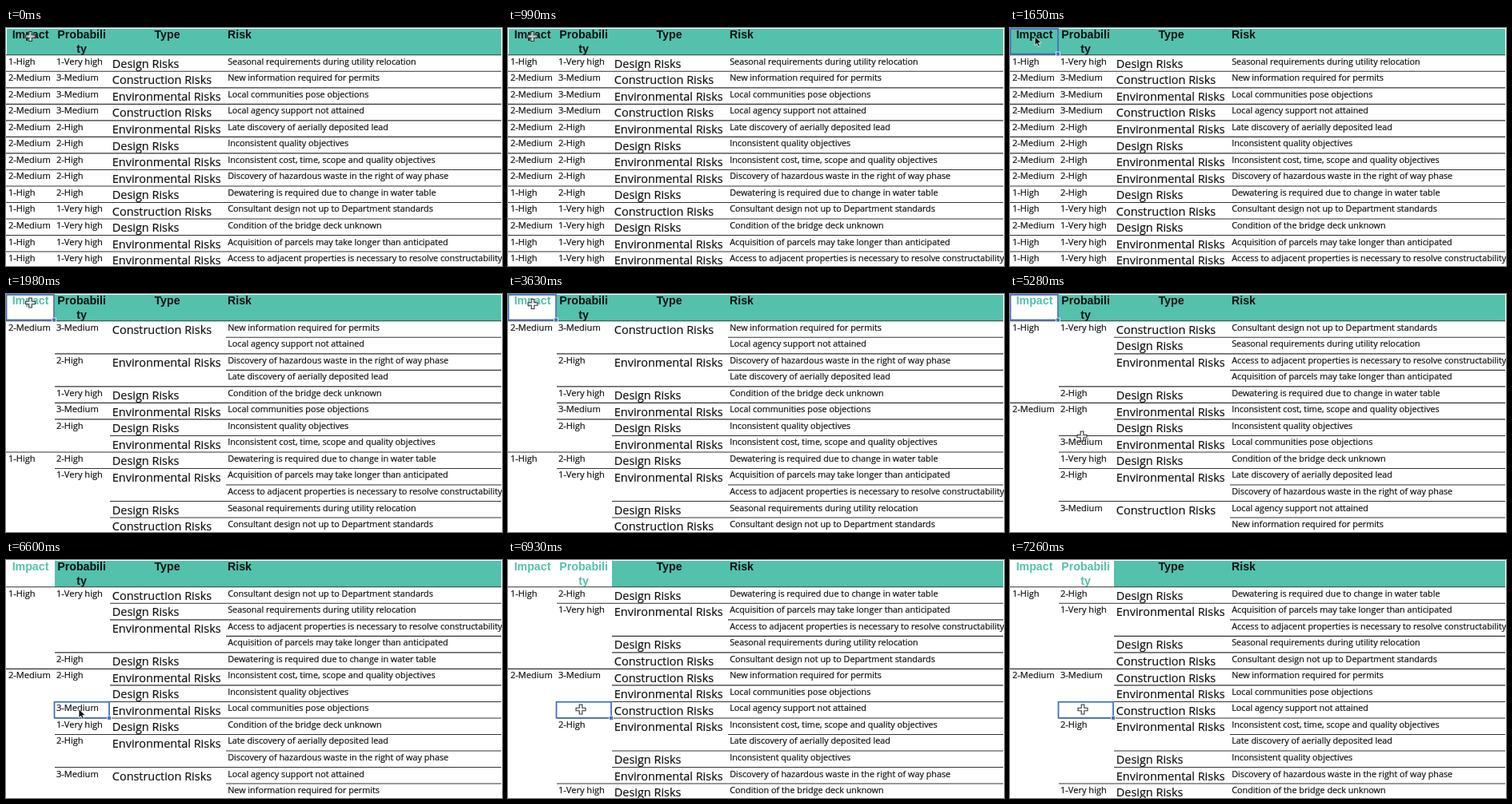
Recreate the animation shown at these times as an HTML page. Size 620 px wide and 298 px high, loop 8000 ms.

```html
<!DOCTYPE html>
<html lang="en">
<head>
<meta charset="utf-8">
<title>Risk table sorting</title>
<style>
html, body { margin: 0; width: 100%; height: 100%; overflow: hidden; background: #fff; }
svg { display: block; width: 620px; height: 298px; }
text { fill: #111; font: 11.05px "Open Sans", "Noto Sans", sans-serif; stroke: #111; stroke-width: 0.2px; }
text.risk { font-size: 10.8px; }
text.type { font-size: 14.45px; }
text.head { font: bold 14.2px "Liberation Sans", Arial, sans-serif; stroke: none; }
</style>
</head>
<body>
<svg id="stage" viewBox="0 0 620 298"></svg>
<script>
const LOOP = 8000;
const TEAL = '#53c1ac', INK = '#111', LINE = '#333', BLUE = '#4472bd';
const COLS = [0, 61, 130, 275];
const CELLS = [
  { x: 3, drop: 12, kind: 'cell' },
  { x: 63, drop: 12, kind: 'cell' },
  { x: 132.8, drop: 16.1, kind: 'type' },
  { x: 277.2, drop: 12, kind: 'risk' },
];
const TOP = 33.8, STEP = 20.52;

const IMPACT = { H: '1-High', M: '2-Medium' };
const CHANCE = { V: '1-Very high', H: '2-High', M: '3-Medium' };
const TYPE = { D: 'Design Risks', C: 'Construction Risks', E: 'Environmental Risks' };

const RISKS = [
  'HVD Seasonal requirements during utility relocation',
  'MMC New information required for permits',
  'MME Local communities pose objections',
  'MMC Local agency support not attained',
  'MHE Late discovery of aerially deposited lead',
  'MHD Inconsistent quality objectives',
  'MHE Inconsistent cost, time, scope and quality objectives',
  'MHE Discovery of hazardous waste in the right of way phase',
  'HHD Dewatering is required due to change in water table',
  'HVC Consultant design not up to Department standards',
  'MVD Condition of the bridge deck unknown',
  'HVE Acquisition of parcels may take longer than anticipated',
  'HVE Access to adjacent properties is necessary to resolve constructability',
].map(s => [IMPACT[s[0]], CHANCE[s[1]], TYPE[s[2]], s.slice(4)]);

const unsorted = RISKS.map((_, i) => i);
const byImpact = [1, 3, 7, 4, 10, 2, 5, 6, 8, 11, 12, 0, 9];
const byChance = [8, 11, 12, 0, 9, 1, 2, 3, 6, 4, 5, 7, 10];

// grouped = number of sorted columns, which get pale headers and merged cells
const TABLES = [
  { at: 0, order: unsorted, grouped: 0 },
  { at: 1980, order: byImpact, grouped: 1 },
  { at: 3960, order: [...byImpact].reverse(), grouped: 1 },
  { at: 6930, order: byChance, grouped: 2 },
];
const SELECTIONS = [
  { at: 0 },
  { at: 1650, box: [0.5, 1, 60, 32.5] },
  { at: 6270, box: [60.5, 177.7, 129, 197.7] },
];
const CURSORS = [
  { at: 0, shape: 'cross', x: 30.5, y: 10.5 },
  { at: 1650, shape: 'arrow', x: 31, y: 10.5 },
  { at: 1980, shape: 'cross', x: 30.5, y: 11 },
  { at: 3630, shape: 'cross', x: 31, y: 12.5 },
  { at: 4620, shape: 'cross', x: 90, y: 178 },
  { at: 6270, shape: 'arrow', x: 91, y: 186.5 },
  { at: 6930, shape: 'cross', x: 91, y: 187 },
];
const SHAPES = {
  cross: 'M-1.8-6h3.6v4.2H6v3.6H1.8V6h-3.6V1.8H-6v-3.6h4.2z',
  arrow: 'M0 0V11.2L2.6 8.8L4.5 12.8L6.5 11.9L4.7 8.1H8.2z',
};

const stage = document.getElementById('stage');

function add(parent, tag, attrs, content) {
  const node = document.createElementNS('http://www.w3.org/2000/svg', tag);
  for (const key in attrs) node.setAttribute(key, attrs[key]);
  if (content) node.textContent = content;
  parent.append(node);
  return node;
}

function rule(parent, x, y) {
  add(parent, 'path', { d: `M${x} ${y}H619`, stroke: LINE, 'stroke-width': 1.1 });
}

function buildHeader(g, grouped) {
  const left = Math.max(COLS[grouped], 1);
  add(g, 'rect', { x: left, y: 1, width: 619 - left, height: TOP - 1, fill: TEAL });
  const label = (col, x, y, s, anchor = 'middle') => add(g, 'text', {
    class: 'head', x, y, 'text-anchor': anchor,
    style: `fill:${col < grouped ? TEAL : INK}`,
  }, s);
  label(0, 30.5, 12.8, 'Impact');
  label(1, 94.6, 12.8, 'Probabili');
  label(1, 94.6, 31, 'ty');
  label(2, 201.5, 12.8, 'Type');
  label(3, 277, 12.8, 'Risk', 'start');
  rule(g, 0, TOP);
}

function buildTable({ order, grouped }) {
  const g = add(stage, 'g', {});
  buildHeader(g, grouped);
  order.forEach((id, i) => {
    const row = RISKS[id], above = RISKS[order[i - 1]];
    let first = 0;
    if (grouped && above) while (row[first] === above[first]) first++;
    const top = TOP + STEP * i;
    if (i) rule(g, COLS[first], top);
    CELLS.slice(first).forEach(({ x, drop, kind }, c) =>
      add(g, 'text', { class: kind, x, y: top + drop }, row[first + c]));
  });
  return g;
}

function buildSelection({ box }) {
  const g = add(stage, 'g', {});
  if (box) {
    const [x, y, right, bottom] = box;
    add(g, 'rect', { x, y, width: right - x, height: bottom - y, fill: 'none', stroke: BLUE, 'stroke-width': 1.8 });
    add(g, 'rect', { x: right - 2.5, y: bottom - 2.5, width: 5, height: 5, fill: BLUE, stroke: '#fff', 'stroke-width': 0.8 });
  }
  return g;
}

function buildCursor({ shape, x, y }) {
  const arrow = shape === 'arrow';
  return add(stage, 'path', {
    d: SHAPES[shape], transform: `translate(${x} ${y})`,
    fill: arrow ? '#111' : '#fff', 'fill-opacity': arrow ? 1 : 0.7,
    stroke: arrow ? '#fff' : '#333', 'stroke-width': arrow ? 0.8 : 1.1,
  });
}

const tracks = [[TABLES, buildTable], [SELECTIONS, buildSelection], [CURSORS, buildCursor]]
  .map(([steps, build]) => steps.map(step => ({ at: step.at, node: build(step) })));

function draw(now) {
  const t = now % LOOP;
  for (const steps of tracks) {
    const current = steps.filter(s => s.at <= t).pop();
    for (const s of steps) s.node.style.display = s === current ? '' : 'none';
  }
}

const start = performance.now();
function tick() {
  draw(performance.now() - start);
  requestAnimationFrame(tick);
}
tick();
</script>
</body>
</html>
```
